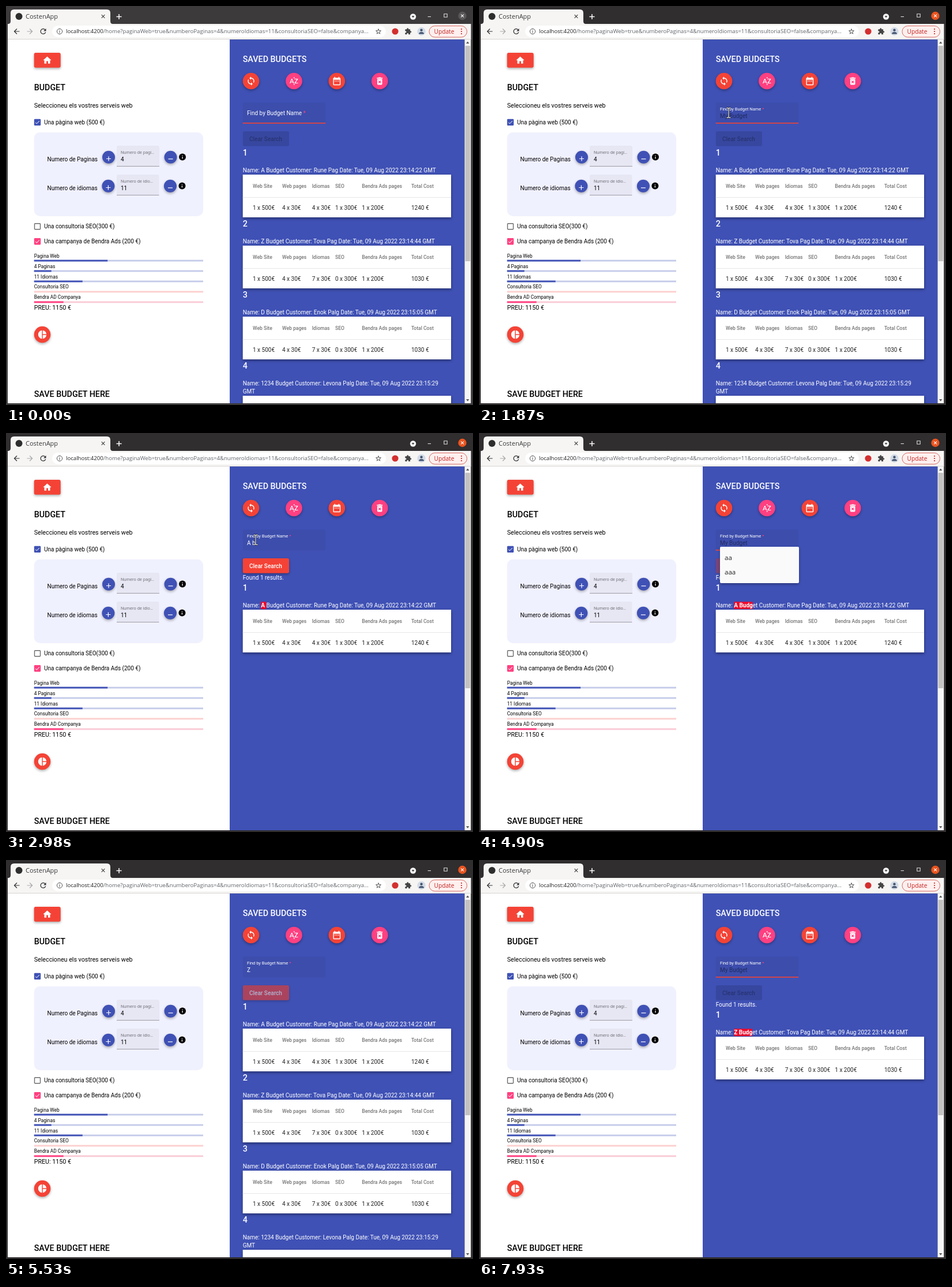
Animation of 810x691 px, one loop 8000 ms. Source, as an HTML page:

```html
<!DOCTYPE html>
<html lang="en">
<head>
<meta charset="utf-8">
<title>CostenApp</title>
<style>
  html, body { margin: 0; width: 100%; height: 100%; overflow: hidden; background: #3b393a; }
  svg { display: block; }
  text { font: 10px Roboto, sans-serif; white-space: pre; }
  .ui { font-family: "Open Sans", sans-serif; }
  .h { font-weight: 500; font-size: 14.3px; }
  .th { font-weight: 500; font-size: 8.57px; fill: #757575; }
  .small { font-size: 7.5px; fill: #74747c; }
  .bar { font-size: 8.33px; }
  .w { fill: #fff; }
  .lift { filter: drop-shadow(0 2px 2px rgba(0,0,0,.32)); }
  .card { filter: drop-shadow(0 2.5px 2.5px rgba(0,0,0,.42)); }
  #frame { fill: #3c3a3b; }
  #close { fill: #5a5858; }
  .active #frame { fill: #302e2f; }
  .active #close { fill: #e95420; }
</style>
</head>
<body>
<svg id="stage" width="810" height="691" viewBox="0 0 810 691"></svg>
<script>
const BLUE = '#3f51b5', RED = '#f44336', PINK = '#ff4081', INK = '#212121';
const LOOP = 8000;

const rect = (x, y, w, h, fill, r = 0, more = '') =>
  `<rect x="${x}" y="${y}" width="${w}" height="${h}" rx="${r}" fill="${fill}" ${more}/>`;
const circle = (x, y, r, fill, more = '') =>
  `<circle cx="${x}" cy="${y}" r="${r}" fill="${fill}" ${more}/>`;
const text = (x, y, s, cls = '', more = '') =>
  `<text x="${x}" y="${y}" class="${cls}" ${more}>${s}</text>`;
const line = (d, stroke, w = 1.3) =>
  `<path d="${d}" fill="none" stroke="${stroke}" stroke-width="${w}"/>`;
// 24-unit glyph centred on a point
const icon = (x, y, d, fill = '#fff', k = .714) =>
  `<path transform="translate(${x - 12 * k} ${y - 12 * k}) scale(${k})" fill="${fill}" d="${d}"/>`;
const size = n => `style="font-size:${n}px"`;

const glyph = {
  home: 'M10 20v-6h4v6h5v-8h3L12 3 2 12h3v8z',
  pie: 'M11 2v20c-5.07-.5-9-4.79-9-10s3.93-9.5 9-10zm2.03 0v8.99H22c-.47-4.74-4.24-8.52-8.97-8.99zm0 11.01V22c4.74-.47 8.5-4.25 8.97-8.99z',
  sync: 'M12 4V1L8 5l4 4V6c3.31 0 6 2.69 6 6 0 1.01-.25 1.97-.7 2.8l1.46 1.46C19.54 15.03 20 13.57 20 12c0-4.42-3.58-8-8-8zm0 14c-3.31 0-6-2.69-6-6 0-1.01.25-1.97.7-2.8L5.24 7.74C4.46 8.97 4 10.43 4 12c0 4.42 3.58 8 8 8v3l4-4-4-4z',
  alpha: 'M14.94 4.66h-4.72l2.36-2.36zm-4.69 14.71h4.66l-2.33 2.33zM6.1 6.27L1.6 17.73h1.84l.92-2.45h5.11l.92 2.45h1.84L7.74 6.27zm-1.13 7.37l1.94-5.18 1.94 5.18zm10.76 2.5h6.12v1.59h-8.53v-1.29l5.92-8.56h-5.88v-1.6h8.3v1.26z',
  date: 'M9 11H7v2h2zm4 0h-2v2h2zm4 0h-2v2h2zm2-7h-1V2h-2v2H8V2H6v2H5c-1.1 0-2 .9-2 2v14c0 1.1.9 2 2 2h14c1.1 0 2-.9 2-2V6c0-1.1-.9-2-2-2zm0 16H5V9h14z',
  bin: 'M6 19c0 1.1.9 2 2 2h8c1.1 0 2-.9 2-2V7H6zm2.46-7.12l1.41-1.41L12 12.59l2.12-2.12 1.41 1.41L13.41 14l2.12 2.12-1.41 1.41L12 15.41l-2.12 2.12-1.41-1.41L10.59 14zM15.5 4l-1-1h-5l-1 1H5v2h14V4z',
  back: 'M20 11H7.83l5.59-5.59L12 4l-8 8 8 8 1.41-1.41L7.83 13H20z',
  reload: 'M17.65 6.35C16.2 4.9 14.21 4 12 4c-4.42 0-8 3.58-8 8s3.58 8 8 8c3.73 0 6.84-2.55 7.73-6h-2.08c-.82 2.33-3.04 4-5.65 4-3.31 0-6-2.69-6-6s2.69-6 6-6c1.66 0 3.14.69 4.22 1.78L13 11h7V4z',
  star: 'M22 9.24l-7.19-.62L12 2 9.19 8.63 2 9.24l5.46 4.73L5.82 21 12 17.27 18.18 21l-1.63-7.03zM12 15.4l-3.76 2.27 1-4.28-3.32-2.88 4.38-.38L12 6.1l1.71 4.04 4.38.38-3.32 2.88 1 4.28z',
  puzzle: 'M20.5 11H19V7c0-1.1-.9-2-2-2h-4V3.5a2.5 2.5 0 0 0-5 0V5H4c-1.1 0-2 .9-2 2v3.8h1.5a2.7 2.7 0 0 1 0 5.4H2V20c0 1.1.9 2 2 2h3.8v-1.5a2.7 2.7 0 0 1 5.4 0V22H17c1.1 0 2-.9 2-2v-4h1.5a2.5 2.5 0 0 0 0-5z',
  tick: 'M9 16.2L4.8 12l-1.4 1.4L9 19 21 7l-1.4-1.4z'
};

const fab = (x, y, r, color, inner) =>
  `<g class="lift">${circle(x, y, r, color)}</g>${inner}`;

function browser() {
  const x = (cx, cy, r, c, w) =>
    line(`M${cx - r} ${cy - r}l${2 * r} ${2 * r}m0 ${-2 * r}l${-2 * r} ${2 * r}`, c, w);
  return `<rect id="frame" width="810" height="691"/>`
    + `<path d="M3 31c4 0 5-2 5-5V12q0-6 6-6H175q6 0 6 6V26c0 3 1 5 5 5H806.5V58H3z" fill="#f6f5f4"/>`
    + circle(22.5, 18, 6, '#2e2e2e')
    + text(34, 22.3, 'CostenApp', 'ui', 'style="font-size:11px" fill="#3a3a3a"')
    + x(168.5, 18, 2.8, '#444', 1.2)
    + line('M191.5 18.5h9m-4.5 -4.5v9', '#fff', 1.5)
    + circle(706, 18.5, 5.2, '#f4f4f4') + '<path d="M703.6 17.2h4.8l-2.4 3z" fill="#333"/>'
    + line('M731.5 18.5h5.5', '#ddd', 1.1) + line('M759.8 13.8h5.4v5.4h-5.4z', '#ddd', 1.1)
    + '<circle id="close" cx="791.5" cy="17" r="7.2"/>' + x(791.5, 17, 2.4, '#fff', 1.1)
    + rect(80, 34, 579, 20, '#fff', 10)
    + icon(18.5, 44, glyph.back, '#333', .62)
    + `<g transform="translate(83 0) scale(-1 1)">${icon(41.5, 44, glyph.back, '#aaa', .62)}</g>`
    + icon(64.5, 44, glyph.reload, '#333', .62)
    + circle(93, 44, 4.6, 'none', 'stroke="#555"') + line('M93 43.3v3.2m0 -5v1', '#555', 1.1)
    + text(104, 47.4, 'localhost:4200<tspan fill="#5f6368">/home?paginaWeb=true&amp;numberoPaginas=4&amp;numeroIdiomas=11&amp;consultoriaSEO=false&amp;companya…</tspan>',
        'ui', 'style="font-size:9.62px" fill="#222"')
    + icon(646, 44, glyph.star, '#444', .52)
    + circle(675, 44, 5.6, '#d32f2f')
    + icon(697.5, 44, glyph.puzzle, '#444', .52)
    + circle(720.5, 44, 7.2, '#d3dbe6') + circle(720.5, 41.8, 2.2, '#44546f')
    + '<path d="M716 48.5q0-3.6 4.5-3.6t4.5 3.6z" fill="#44546f"/>'
    + rect(734, 34.5, 65.5, 19.5, '#fdf0ef', 9.7, 'stroke="#d9675f"')
    + text(742.5, 47.7, 'Update', 'ui', 'style="font-size:10.2px" fill="#c5221f"')
    + [40, 44, 48].map(y => circle(790, y, 1.1, '#c5221f')).join('')
    + rect(3, 57, 803.5, 1, '#d8d5d2');
}

function check(y, color, on, label) {
  const box = on
    ? rect(48.8, y, 11.4, 11.4, color, 1.4) + icon(54.5, y + 5.7, glyph.tick, '#fff', .42)
    : rect(49.5, y + .7, 10, 10, '#fff', 1, 'stroke="#6a6a6a" stroke-width="1.4"');
  return box + text(66, y + 9.2, label);
}

function stepper(y, dx, label, hint, value) {
  const cy = y + 19.7;
  return text(71.5, y + 26.7, label)
    + fab(178 + dx, cy, 11, BLUE, line(`M${174 + dx} ${cy + 2.8}h8m-4 -4v8`, '#fff', 1.2))
    + `<path d="M192 ${y + 36}V${y + 3}q0-3 3-3h${68 + dx}q3 0 3 3v33z" fill="#e6e7f3"/>`
    + rect(192, y + 35.2, 74 + dx, .9, '#92929c')
    + text(199, y + 14, hint, 'small') + text(199, y + 27, value)
    + fab(285.5 + dx, cy, 11, BLUE, line(`M${281.5 + dx} ${cy + 3.2}h8`, '#fff', 1.2))
    + circle(306 + dx, cy - .2, 6, '#000') + line(`M${306 + dx} ${cy - .8}v3.6m0 -6v1.3`, '#fff', 1.3);
}

function left() {
  const bars = [
    ['Pagina Web', 127.5, BLUE, '#c5cbe9'], ['4 Paginas', 30, BLUE, '#c5cbe9'],
    ['11 Idiomas', 84, BLUE, '#c5cbe9'], ['Consultoria SEO', 0, RED, '#fbd0cf'],
    ['Bendra AD Companya', 51, PINK, '#fbcbd6']
  ];
  return rect(3, 58, 385, 630, '#fff')
    + `<g class="lift">${rect(48.7, 81, 46, 25.8, RED, 2.8)}</g>` + icon(71.5, 94, glyph.home)
    + text(48.7, 146, 'BUDGET', 'h')
    + text(48.7, 176, 'Seleccioneu els vostres serveis web', '', size(10.72))
    + check(195.7, BLUE, true, 'Una pàgina web (500 €)')
    + rect(48.7, 218.7, 293.3, 145.3, '#f0f1fe', 10)
    + stepper(242, 0, 'Numero de Paginas', 'Numero de pagi…', '4')
    + stepper(292, -.6, 'Numero de idiomas', 'Numero de idio…', '11')
    + check(376, PINK, false, 'Una consultoria SEO(300 €)')
    + check(402, PINK, true, 'Una campanya de Bendra Ads (200 €)')
    + bars.map(([label, w, on, off], i) => {
        const y = 439.6 + i * 17.95;
        return text(48.7, y - 4, label, 'bar') + rect(48.7, y, 293.3, 2.86, off) + rect(48.7, y, w, 2.86, on);
      }).join('')
    + text(48.7, 526, 'PREU: 1150 €', '', size(10.7))
    + fab(63, 569, 14.3, RED, icon(63, 569, glyph.pie))
    + text(48.7, 676.6, 'SAVE BUDGET HERE', 'h');
}

const budgets = [
  { name: 'A', who: 'Rune Pag', time: '23:14:22', cells: ['4', '1', '1240'] },
  { name: 'Z', who: 'Tova Pag', time: '23:14:44', cells: ['7', '0', '1030'] },
  { name: 'D', who: 'Enok Palg', time: '23:15:05', cells: ['7', '0', '1030'] },
  { name: '1234', who: 'Levona Palg', time: '23:15:29', cells: ['7', '0', '1030'] }
];
const title = b => `${b.name} Budget`;
const tail = b => ` Customer: ${b.who} Date: Tue, 09 Aug 2022 ${b.time}`;
const cols = [428, 479, 530.7, 571, 617.3, 703];
const heads = ['Web Site', 'Web pages', 'Idiomas', 'SEO', 'Bendra Ads pages', 'Total Cost'];

function card(y, [lang, seo, total]) {
  const row = ['1 x 500€', '4 x 30€', `${lang} x 30€`, `${seo} x 300€`, '1 x 200€', `${total} €`];
  return `<g class="card">${rect(410.7, y, 361.3, 74, '#fff')}</g>` + rect(410.7, y + 39, 361.3, .8, '#e0e0e0')
    + cols.map((x, i) => text(x, y + 22.6, heads[i], 'th') + text(x, y + 60.6, row[i], '', `fill="${INK}"`)).join('');
}

function fullList() {
  return budgets.map((b, i) => {
    const y = 259 + i * 123;
    const wrap = i === 3;
    return text(410.7, y, i + 1, 'h w')
      + text(410.7, y + 29, `Name: ${title(b)}${tail(b)}${wrap ? '' : ' GMT'}`, 'w')
      + (wrap ? text(410.7, y + 43, 'GMT', 'w') : '')
      + card(y + (wrap ? 47 : 33), b.cells);
  }).join('');
}

function right() {
  const tools = [['sync', RED], ['alpha', PINK], ['date', RED], ['bin', PINK]];
  return rect(388, 58, 407.5, 630, BLUE)
    + text(410.7, 97, 'SAVED BUDGETS', 'h w')
    + tools.map(([g, c], i) => fab(425 + i * 74.4, 130, 14.3, c, icon(425 + i * 74.4, 130, glyph[g]))).join('')
    + rect(410.7, 167, 143.5, 36.5, 'rgba(0,0,0,.05)', 3)
    + `<rect id="rule" x="410.7" y="202" width="143.5" height="1.6" fill="${RED}"/>`
    + `<text id="label" class="w">Find by Budget Name<tspan fill="${PINK}"> *</tspan></text>`
    + text(418, 194, 'My Budget', '', 'id="hint" fill="rgba(0,0,0,.45)"')
    + text(418, 194, '', 'w', 'id="value"')
    + rect(418, 185.5, .9, 11.5, RED, 0, 'id="caret"')
    + rect(410.7, 217, 80.3, 25.8, 'rgba(0,0,0,.12)', 2.8)
    + text(422, 233.5, 'Clear Search', '', 'id="off" fill="rgba(0,0,0,.28)" style="font-weight:500"')
    + `<g id="on"><g class="lift">${rect(410.7, 217, 80.3, 25.8, RED, 2.8)}</g>`
    + text(422, 233.5, 'Clear Search', 'w', 'style="font-weight:500"') + '</g>'
    + `<g id="all">${fullList()}</g>`
    + '<g id="found">' + text(410.7, 253.5, 'Found 1 results.', 'w') + text(410.7, 273, '1', 'h w')
    + '<rect id="mark" y="292.3" height="12.6" fill="#f0082c"/>'
    + '<text x="410.7" y="302.3" class="w"><tspan id="pre">Name: </tspan><tspan id="hit" font-weight="700"></tspan><tspan id="post"></tspan></text>'
    + `<g id="cardA">${card(306, budgets[0].cells)}</g><g id="cardZ">${card(306, budgets[1].cells)}</g></g>`
    + `<g id="popup"><g class="lift">${rect(418, 197, 137, 63, '#fafafa', 2)}</g>`
    + text(426, 219.6, 'aa', 'ui', 'style="font-size:11.5px" fill="#222"')
    + text(426, 245.4, 'aaa', 'ui', 'style="font-size:11.5px" fill="#222"') + '</g>';
}

const edges = () => rect(795.5, 58, 11, 630, '#f5f5f5') + rect(796.6, 69, 8.6, 373, '#c3c2c1')
  + '<path d="M798 65h5.4l-2.7-3.4zm0 16" fill="#555"/><path d="M798 681h5.4l-2.7 3.4z" fill="#555"/>'
  + '<g id="arrow"><path d="M0 0v13l3-2.7 2 4.7 2.2-1-2-4.5h4z" fill="#111" stroke="#fff" stroke-width=".9"/></g>'
  + '<g id="beam"><path d="M-3.4-8.4h2.2l1.2 1 1.2-1h2.2M0-7.4V7.4M-3.4 8.4h2.2l1.2-1 1.2 1h2.2" fill="none" stroke="#222" stroke-width="2.6"/>'
  + '<path d="M-3.4-8.4h2.2l1.2 1 1.2-1h2.2M0-7.4V7.4M-3.4 8.4h2.2l1.2-1 1.2 1h2.2" fill="none" stroke="#fff" stroke-width="1.1"/></g>';

const stage = document.getElementById('stage');
stage.innerHTML = '<clipPath id="view"><rect x="3" y="58" width="803.5" height="630"/></clipPath>'
  + browser() + `<g clip-path="url(#view)">${left()}${right()}${edges()}</g>`;

const $ = id => document.getElementById(id);
const show = (id, a) => $(id).setAttribute('opacity', +a);
const move = (id, x, y, k = 1) => $(id).setAttribute('transform', `translate(${x} ${y}) scale(${k})`);
const ramp = (t, a, b) => {
  const p = Math.min(1, Math.max(0, (t - a) / (b - a)));
  return 1 - (1 - p) ** 3;
};
const within = (t, a, b) => t >= a && t < b;
const at = (keys, t) => keys.reduce((v, [time, s]) => t >= time ? s : v, '');

const typed = [
  [2170, 'A'], [2590, 'A '], [2980, 'A b'], [3460, 'A bu'], [3700, 'A bud'], [4000, 'A budg'], [4810, ''],
  [5450, 'Z'], [5550, 'Z '], [5940, 'Z B'], [6020, 'Z Bu'], [6110, 'Z Bud'], [6670, 'Z Budg'], [7630, '']
];
// results trail the keys by the search delay
const searched = [
  [2400, 'A'], [2820, 'A '], [3210, 'A B'], [3690, 'A Bu'], [3930, 'A Bud'], [4230, 'A Budg'], [5040, ''],
  [5680, 'Z'], [5780, 'Z '], [6170, 'Z B'], [6250, 'Z Bu'], [6340, 'Z Bud'], [6900, 'Z Budg']
];

let last = null;
function results(query) {
  if (query === last) return;
  last = query;
  show('all', !query);
  show('found', !!query);
  if (!query) return;
  const b = budgets.find(b => b.name === query[0]);
  $('hit').textContent = query;
  $('post').textContent = title(b).slice(query.length) + tail(b) + ' GMT';
  $('mark').setAttribute('x', 410.7 + $('pre').getComputedTextLength());
  $('mark').setAttribute('width', $('hit').getComputedTextLength());
  show('cardA', b.name === 'A');
  show('cardZ', b.name === 'Z');
}

function draw(t) {
  stage.classList.toggle('active', t >= 1140);

  const p = ramp(Math.floor((t - 260) / 79) * 79, 0, 790);
  const x = 30 + 403 * p, y = 424 - 239 * p;
  const overField = x > 411 && y < 204;
  move('arrow', x, y);
  move('beam', x, y);
  show('arrow', t >= 260 && !overField);
  show('beam', t < 3460 && t >= 260 && overField);

  const value = at(typed, t);
  const up = ramp(t, 1210, 1610);
  move('label', 418, 189 - 8 * up, 1 - .25 * up);
  show('hint', value ? 0 : up);
  $('value').textContent = value;
  show('rule', !value);
  show('caret', within(t, 1370, 1870) || within(t, 5040, 5450));
  show('popup', within(t, 4810, 5040));

  const lit = ramp(t, 2170, 2470) - ramp(t, 4810, 5110) + ramp(t, 5450, 5750) - ramp(t, 7630, 7930);
  show('on', lit);
  show('off', 1 - lit);
  results(at(searched, t));
}

function tick() {
  draw(performance.now() % LOOP);
  requestAnimationFrame(tick);
}
tick();
</script>
</body>
</html>
```
